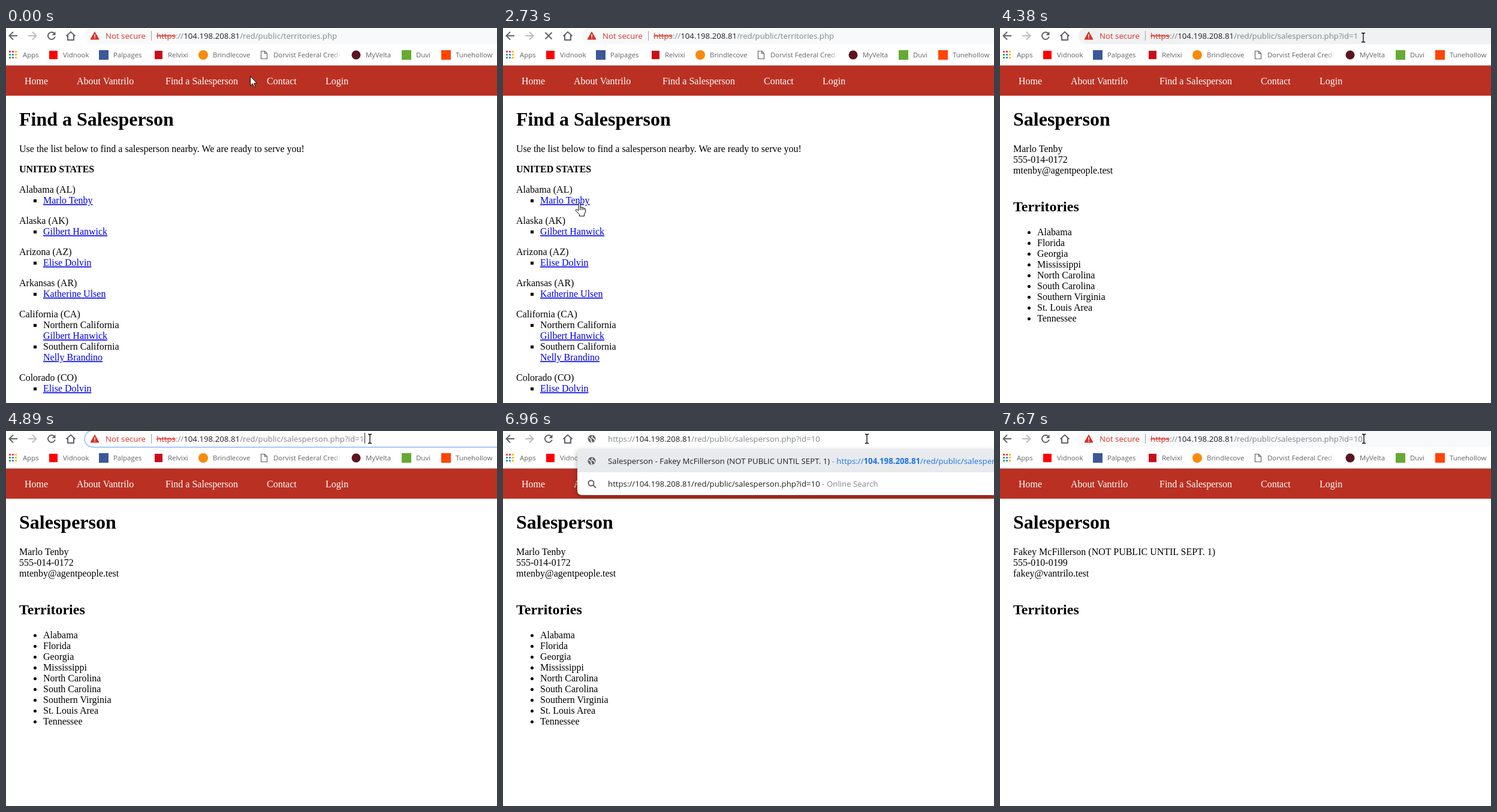
Recreate the animation shown at these times as an HTML page. Size 819 by 626 pixels, loop 8000 ms.

```html
<!DOCTYPE html>
<html lang="en">
<head>
<meta charset="utf-8">
<style>
  html, body { margin: 0; width: 100%; height: 100%; overflow: hidden; background: #fff; }
  svg { display: block; }
  text { white-space: pre; }
  .ui { font: 13.25px "Open Sans", "Noto Sans", sans-serif; fill: #80868b; }
  .mark { font: 11.4px "Open Sans", "Noto Sans", sans-serif; fill: #5f6368; }
  .page { font: 16px "Liberation Serif", serif; fill: #000; }
  .bold { font-weight: bold; }
  .h1 { font-size: 32px; font-weight: bold; }
  .h2 { font-size: 24px; font-weight: bold; }
  .link { fill: #00e; text-decoration: underline; }
  .nav { fill: #fff; }
  .host { fill: #202124; }
  .red { fill: #d93025; }
  .struck { fill: #d93025; text-decoration: line-through; }
  .blue { fill: #1a73e8; }
  .selected, .selected tspan { fill: #fff; }
  .icon { fill: none; stroke: #5f6368; stroke-width: 2; }
  .card { filter: drop-shadow(0 3px 5px #0005); }
</style>
</head>
<body>
<svg id="stage" width="819" height="626" viewBox="0 0 819 626"></svg>
<script>
const LOOP = 8000;
const stage = document.getElementById('stage');
const timed = [];

// Adds a layer that is visible from one time to another.
function layer(markup, from = 0, to = LOOP) {
  const g = document.createElementNS('http://www.w3.org/2000/svg', 'g');
  g.innerHTML = markup;
  stage.append(g);
  timed.push({ g, from, to });
  return g;
}
const text = (x, y, content, cls = 'page') => `<text x="${x}" y="${y}" class="${cls}">${content}</text>`;
const rect = (x, y, w, h, fill, more = '') => `<rect x="${x}" y="${y}" width="${w}" height="${h}" fill="${fill}" ${more}/>`;
const circle = (x, y, r, fill) => `<circle cx="${x}" cy="${y}" r="${r}" fill="${fill}"/>`;
const path = (d, more = 'class="icon"') => `<path d="${d}" ${more}/>`;

// ---- Web pages ----
const AGENT = 'Marlo Tenby';
const TESTER = 'Fakey McFillerson (NOT PUBLIC UNTIL SEPT. 1)';

function territoriesPage() {
  const states = [
    ['Alabama (AL)', AGENT], ['Alaska (AK)', 'Gilbert Hanwick'],
    ['Arizona (AZ)', 'Elise Dolvin'], ['Arkansas (AR)', 'Katherine Ulsen'],
    ['California (CA)', 'Northern California/Gilbert Hanwick', 'Southern California/Nelly Brandino'],
    ['Colorado (CO)', 'Elise Dolvin']
  ];
  let out = text(22, 163, 'Find a Salesperson', 'page h1') +
    text(22, 207, 'Use the list below to find a salesperson nearby. We are ready to serve you!') +
    text(22, 241, 'UNITED STATES', 'page bold');
  let y = 275;
  for (const [state, ...items] of states) {
    out += text(22, y, state);
    for (const item of items) {
      const lines = item.split('/');
      out += rect(46, y + 11, 5, 5, '#000');
      lines.forEach((line, i) => {
        out += text(62, y += 18, line, i === lines.length - 1 ? 'page link' : 'page');
      });
    }
    y += 34;
  }
  return out;
}

function salespersonPage(details, territories) {
  return text(22, 163, 'Salesperson', 'page h1') +
    details.map((line, i) => text(22, 207 + 18 * i, line)).join('') +
    text(22, 306, 'Territories', 'page h2') +
    territories.map((name, i) =>
      circle(48.5, 341.5 + 18 * i, 2.5, '#000') + text(62, 346 + 18 * i, name)).join('');
}

layer(territoriesPage(), 0, 3250);
layer(salespersonPage([AGENT, '555-014-0172', 'mtenby@agentpeople.test'],
  ['Alabama', 'Florida', 'Georgia', 'Mississippi', 'North Carolina', 'South Carolina',
    'Southern Virginia', 'St. Louis Area', 'Tennessee']), 3250, 7670);
layer(salespersonPage([TESTER, '555-010-0199', 'fakey@vantrilo.test'], []), 7670);

const navItems = [[31, 'Home'], [118, 'About Vantrilo'], [266, 'Find a Salesperson'], [435, 'Contact'], [533, 'Login']];
layer(rect(0, 62, 819, 1, '#c9a9a5') + rect(0, 63, 819, 50, '#ba3123') +
  navItems.map(([x, label]) => text(x, 94, label, 'page nav')).join(''));

// ---- Bookmarks ----
const appColors = ['#ea4335', '#ea4335', '#fbbc04', '#34a853', '#4285f4', '#fbbc04', '#34a853', '#4285f4', '#fbbc04'];
const bookmarks = [[28, 'Apps'], [95, 'Vidnook'], [179, 'Palpages'], [270, 'Relvixi'], [345, 'Brindlecove'],
  [446, 'Dorvist Federal Credi'], [600, 'MyVelta'], [684, 'Duvi'], [750, 'Tunehollow']];
layer(`<defs><linearGradient id="fade"><stop stop-color="#fff" stop-opacity="0"/><stop offset="1" stop-color="#fff"/></linearGradient></defs>` +
  appColors.map((c, i) => rect(5 + i % 3 * 5, 38 + Math.floor(i / 3) * 5, 3, 3, c)).join('') +
  bookmarks.map(([x, label]) => text(x, 49, label, 'mark')).join('') +
  rect(545, 34, 12, 22, 'url(#fade)') + rect(557, 34, 16, 22, '#fff') +
  rect(72, 38, 14, 14, '#f00') + rect(155, 37, 16, 16, '#3b5998') + rect(248, 38, 13, 14, '#c8101a') +
  circle(329, 45, 8, '#f78b0c') + circle(584, 45, 7.5, '#5c1520') +
  rect(660, 37, 16, 16, '#66aa33') + rect(726, 37, 16, 16, '#ff4500') +
  path('M425.5 38.5h6l4 4v9h-10zM431.5 38.5v4h4', 'fill="#fff" stroke="#5f6368" stroke-width="1.2"'));

// ---- Toolbar ----
const pill = (fill, more = '') => rect(131, -1, 720, 28, fill, `rx="14" ${more}`);
layer(pill('#f8f9fa'), 0, 4380);
layer(pill('#eff1f2'), 4380, 4650);
layer(pill('#fff', 'stroke="#a9c7fa" stroke-width="2"'), 4650, 6410);
layer(pill('#f8f9fa'), 7390);

layer(path('M19 13H6M12 6.5L5.5 13l6.5 6.5') +
  path('M37 13h13M44 6.5L50.5 13L44 19.5', 'fill="none" stroke="#b9bcbf" stroke-width="2"') +
  path('M100.5 13.5L108 6.5l7.5 7M103 12v8h10v-8'));
const reload = path('M80.5 9A6 6 0 1 0 81.8 14.5') + path('M82.5 6v6h-6z', 'fill="#5f6368"');
const stop = path('M70.5 7.5l11 11M81.5 7.5l-11 11');
layer(reload, 0, 2730);
layer(stop, 2730, 3250);
layer(reload, 3250, 7390);
layer(stop, 7390, 7670);
layer(reload, 7670);

const globe = y => circle(148, y, 6.5, '#5f6368') +
  path(`M143 ${y - 2}l4 3v3l2 2M149 ${y - 5}l-1 3l4 2l1 3`, 'fill="none" stroke="#fff" stroke-width="1.5"');
const warning = path('M148 6.5L155 19H141z', 'fill="#d93025" stroke="#d93025" stroke-linejoin="round"') +
  rect(147.3, 10.5, 1.5, 4.5, '#fff') + rect(147.3, 16, 1.5, 1.5, '#fff') +
  text(166, 18, 'Not secure', 'ui red') + rect(242, 5, 1, 16, '#9aa0a6');
layer(warning, 0, 6410);
layer(globe(13), 6410, 7390);
layer(warning, 7670);

const address = (page, scheme) => `<tspan class="${scheme}">https</tspan>://<tspan class="host">104.198.208.81</tspan>/red/public/${page}`;
const person = id => 'salesperson.php?id=' + id;
const url = (x, page, scheme = 'struck', cls = 'ui') => text(x, 18, address(page, scheme), cls);
layer(url(251, 'territories.php'), 0, 2850);
layer(url(251, person(1)), 2850, 5150);
layer(rect(251, 2, 347, 22, '#0078d7') + url(251, person(1), 'struck', 'ui selected'), 5150, 5550);
layer(url(251, person(1)), 5550, 6410);
layer(url(175, person(10), ''), 6410, 7390);
layer(url(147, person(10)), 7390, 7670);
layer(url(251, person(10)), 7670);

const caret = x => rect(x, 3, 1, 18, '#202124');
layer(caret(598), 4890, 5150);
layer(caret(598), 5550, 6110);
layer(caret(530), 6410, 6960);

// ---- Suggestions ----
const suggestions = path('M124 31H819V107H132Q124 107 124 99Z', 'fill="#fff"') +
  rect(124, 31, 695, 38, '#e8eaed') + globe(50) +
  text(175, 55, `<tspan class="host">Salesperson - ${TESTER}</tspan> - <tspan class="blue">https://<tspan class="bold">104.198.208.81</tspan>/red/public/${person(10)}</tspan>`, 'ui') +
  '<circle cx="147" cy="87" r="4.5" class="icon"/>' + path('M150.5 90.5l4.5 4.5') +
  text(175, 93, `<tspan class="host">https://104.198.208.81/red/public/${person(10)}</tspan> - Online Search`, 'ui');
layer(`<g class="card">${suggestions}</g>`, 6560, 7390);
layer(`<g class="card" opacity=".12">${suggestions}</g>`, 7390, 7520);

// ---- Pointer: it jumps between [time, x, y] ----
const outline = 'fill="#fff" stroke="#000" stroke-linejoin="round"';
const shapes = {
  arrow: path('M.5 .5V16.5L4.3 13L6.8 18.5L9 17.5L6.6 12.2H11.5Z', outline),
  hand: path('M6 2C6 .2 9 .2 9 2V9C9 7.5 12 7.5 12 9V10C12 8.5 15 8.5 15 10V11C15 9.5 17.5 9.7 17.5 11.5V16L15.5 20V23H7.5V20.5L1.5 14C.5 12.3 2.5 11 4 12.3L6 14Z', outline) +
    path('M9 9v4M12 10v3M15 11v2', 'stroke="#000"'),
  beam: path('M-3 -7.5H-1L0 -6.5L1 -7.5H3M0 -6.5V6.5M-3 7.5H-1L0 6.5L1 7.5H3', 'fill="none" stroke="#000" stroke-width="1.3"')
};
const moves = [
  ['arrow', [0, 407, 80], [150, 380, 99], [300, 305, 145], [420, 244, 187], [570, 219, 220], [700, 238, 188],
    [850, 275, 140], [970, 317, 109], [1100, 305, 125], [1250, 265, 175], [1370, 200, 235], [1500, 145, 278]],
  ['hand', [1620, 122, 295], [1890, 120, 291]],
  ['arrow', [3100, 241, 290], [3250, 360, 258], [3370, 460, 225], [3490, 531, 196], [3620, 553, 176],
    [3770, 555, 177], [3920, 617, 122], [4080, 636, 58], [4230, 602, 25]],
  ['beam', [4380, 606, 16], [4510, 607, 13]]
].flatMap(([shape, ...steps]) => steps.map(([time, x, y]) => ({ shape, time, x, y })));
const pointer = layer('');
let drawnShape = '';

function render(now) {
  const t = now % LOOP;
  for (const { g, from, to } of timed) g.style.display = t >= from && t < to ? '' : 'none';
  const { shape, x, y } = moves.findLast(move => move.time <= t);
  if (shape !== drawnShape) pointer.innerHTML = shapes[drawnShape = shape];
  pointer.setAttribute('transform', `translate(${x} ${y})`);
}

const start = performance.now();
function tick() {
  render(performance.now() - start);
  requestAnimationFrame(tick);
}
tick();
</script>
</body>
</html>
```
